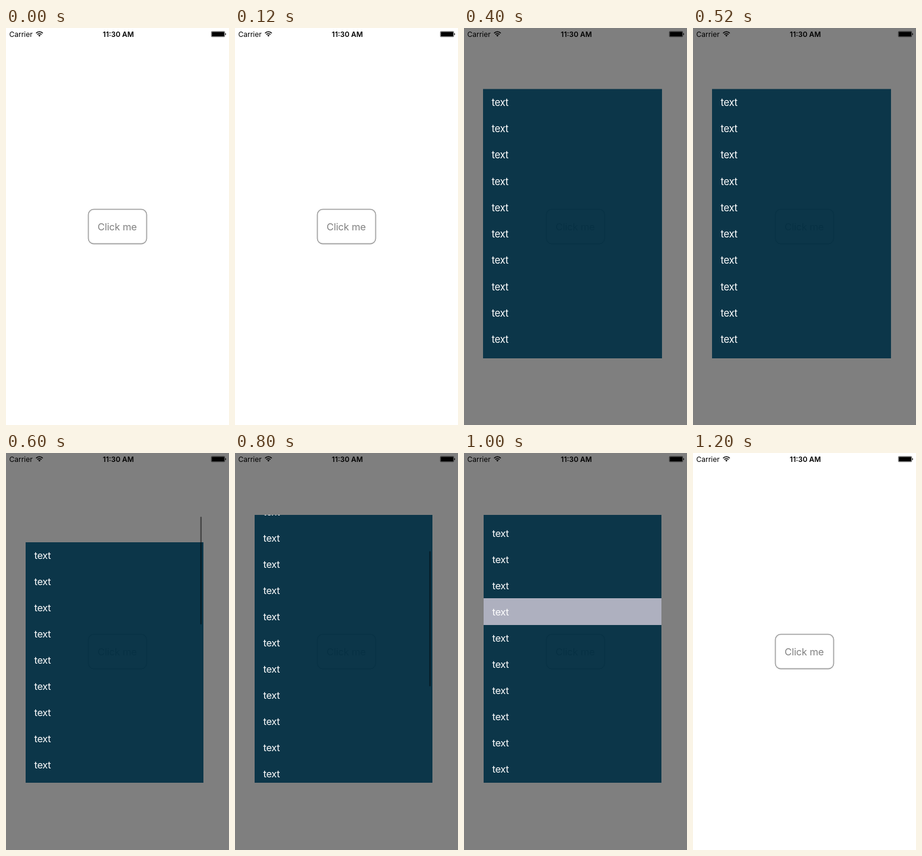
An HTML page for the animation above (1.4 s loop, 375x667 px).

```html
<!DOCTYPE html>
<html lang="en">
<head>
<meta charset="utf-8">
<title>Popup list</title>
<style>
  html, body { margin: 0; width: 100%; height: 100%; overflow: hidden; background: #fff; }
  svg { display: block; width: 100%; height: 100%; font-family: Inter, Roboto, sans-serif; }
  .status { font-size: 12px; }
  .clock { font-weight: 600; text-anchor: middle; }
  .label { font-size: 16.5px; letter-spacing: -.15px; fill: #808080; }
  .row { font-size: 16.5px; letter-spacing: -.35px; fill: #fff; }
  .crisp { shape-rendering: crispEdges; }
</style>
</head>
<body>
<svg viewBox="0 0 375 667">
  <defs>
    <clipPath id="window"><rect class="crisp" x="33" y="104" width="299" height="450"/></clipPath>
  </defs>
  <rect width="375" height="667" fill="#fff"/>

  <g class="status">
    <text x="5.5" y="14.6">Carrier</text>
    <text class="clock" x="189" y="14.6">11:30 AM</text>
  </g>
  <g fill="none" stroke="#000" stroke-width="1.7">
    <path d="M50.6 8.7A7.6 7.6 0 0 1 61.8 8.7"/>
    <path d="M52.7 11A4.8 4.8 0 0 1 59.7 11"/>
  </g>
  <path d="M56.2 14.4L54.3 12.4A2.7 2.7 0 0 1 58.1 12.4Z"/>
  <rect x="345.3" y="5.8" width="22.6" height="9" rx="1.2" fill="none" stroke="#000" stroke-width=".6"/>
  <rect x="346.2" y="6.6" width="20.8" height="7.4" rx=".5"/>
  <path d="M368.6 8.5Q370 8.8 370 10.3T368.6 12.1Z"/>

  <rect x="138.5" y="304.7" width="98" height="57.8" rx="9" fill="none" stroke="#a5a5a5" stroke-width="1.8"/>
  <text class="label" x="154" y="339.6">Click me</text>

  <g id="popup">
    <rect class="crisp" width="375" height="667" fill="#000" fill-opacity=".5"/>
    <g id="panel">
      <g clip-path="url(#window)">
        <rect id="back" class="crisp" x="33" width="299"/>
        <rect id="picked" class="crisp" x="33" width="299" height="45" fill="#aeb0bf"/>
        <g id="rows"></g>
      </g>
      <rect id="bar" x="326.7" width="2.4" rx="1.2" fill="#000" fill-opacity=".45"/>
    </g>
  </g>
</svg>
<script>
const STEP = 200, LOOP = 1400;
const TOP = 104, HEIGHT = 450, ROW = 44, COUNT = 20;
const PICKED_ROW = 6, TRACK = HEIGHT - 6;
const FILL = 'rgba(0,47,68,.9)';

const $ = id => document.getElementById(id);
const set = (el, attrs) => {
  for (const key in attrs) el.setAttribute(key, attrs[key]);
};
const show = (el, on) => set(el, { display: on ? 'inline' : 'none' });
const zoom = k => `translate(187.5 333.5) scale(${k}) translate(-187.5 -333.5)`;

for (let i = 0; i < COUNT; i++) {
  const text = document.createElementNS('http://www.w3.org/2000/svg', 'text');
  set(text, { class: 'row', x: 47.5, y: i * ROW + 28 });
  text.textContent = 'text';
  $('rows').append(text);
}

// The screen updates in hard steps; null means the popup is closed.
const states = [
  null,
  { popup: .1495, panel: .1495, scroll: 0, fill: 'rgba(0,68,99,.95)', bare: true },
  { popup: 1, panel: 1.0067, scroll: 0 },
  { popup: 1, panel: 1, scroll: -46, bar: true },
  { popup: 1, panel: 1, scroll: 115, bar: true },
  { popup: 1, panel: 1, scroll: 123, picked: true },
  null
];

function draw(time) {
  const s = states[Math.floor((time % LOOP) / STEP)];
  show($('popup'), s);
  if (!s) return;

  const first = TOP - s.scroll;
  const pull = Math.max(0, -s.scroll);
  const content = ROW * COUNT;

  set($('popup'), { transform: zoom(s.popup) });
  set($('panel'), { transform: zoom(s.panel) });
  set($('back'), { y: TOP + pull, height: HEIGHT - pull, fill: s.fill || FILL });
  set($('rows'), { transform: `translate(0 ${first})` });
  show($('rows'), !s.bare);

  set($('picked'), { y: first + PICKED_ROW * ROW - 1 });
  show($('picked'), s.picked);

  set($('bar'), {
    y: TOP + 3 + TRACK * Math.max(0, s.scroll) / content,
    height: TRACK * HEIGHT / content - pull
  });
  show($('bar'), s.bar);
}

function tick() {
  draw(performance.now());
  requestAnimationFrame(tick);
}
tick();
</script>
</body>
</html>
```
